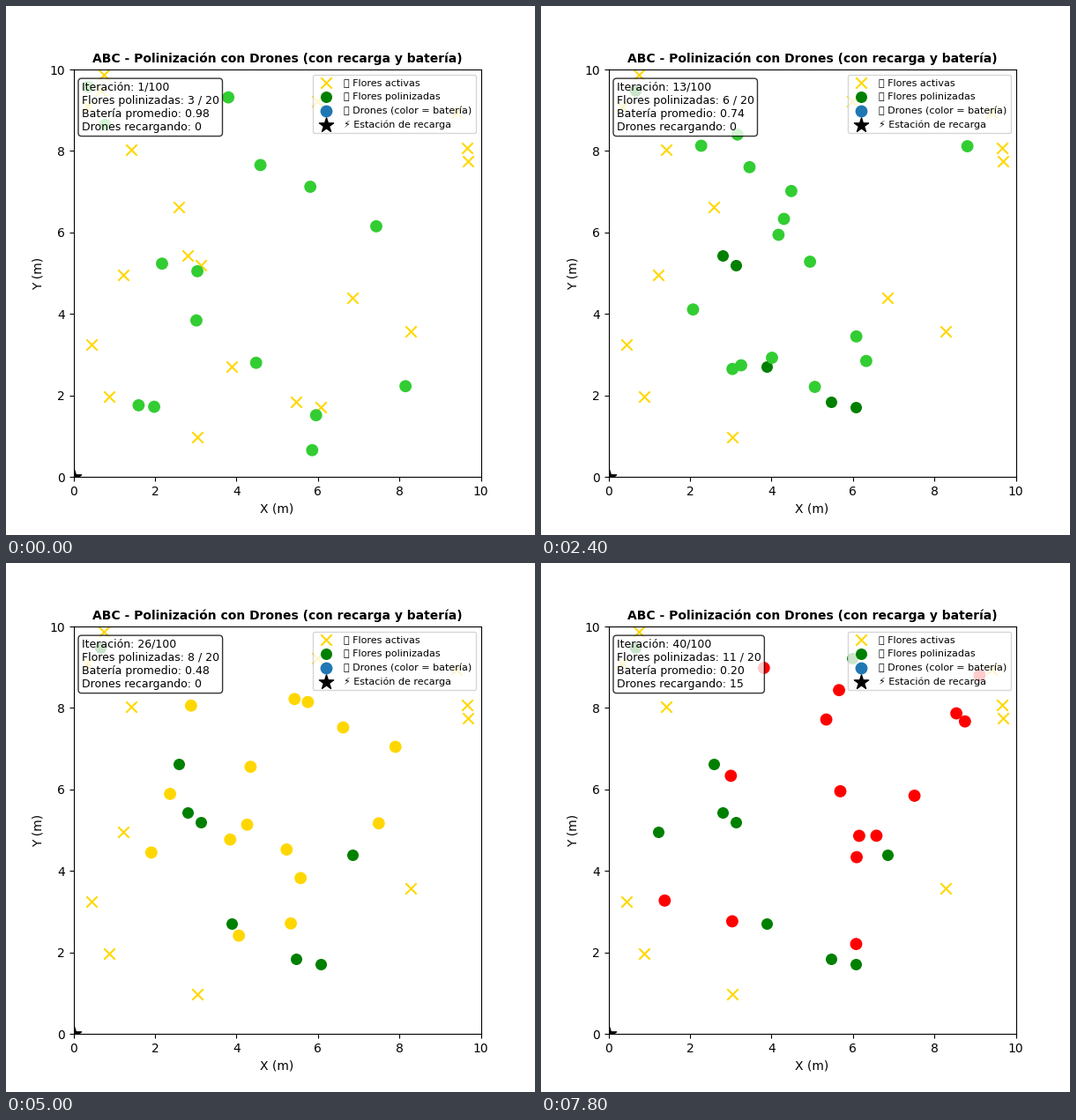
Animation of 600x600 px, one loop 8000 ms. Source, as a matplotlib script:

```python
import matplotlib.pyplot as plt
import numpy as np
from matplotlib.animation import FuncAnimation

FRAMES, STEP_MS = 40, 200
SPEED = 0.2    # metres per iteration
ARRIVE = 0.5   # close enough to head for the next flower
REACH = 0.4    # close enough to pollinate

rng = np.random.RandomState(42)
start = rng.rand(15, 2) * 10
flowers = rng.rand(20, 2) * 10

# flowers each drone heads for, in order
routes = [
    [0, 2], [11, 3], [7, 13], [10], [18, 11], [16], [8, 10], [3, 12],
    [3, 10], [0, 15, 2], [5, 5, 12], [12, 6], [9, 14], [11], [9, 11],
]


def fly(pos, route):
    """Positions of one drone, moving at constant speed from flower to flower."""
    path, leg = [], 0
    for _ in range(FRAMES):
        way = flowers[route[leg]] - pos
        pos = pos + SPEED * way / np.linalg.norm(way)
        path.append(pos)
        if np.linalg.norm(flowers[route[leg]] - pos) < ARRIVE:
            leg = min(leg + 1, len(route) - 1)
    return path


drones = np.stack([fly(p, r) for p, r in zip(start, routes)], axis=1)

# done[k] marks the flowers visited up to and including step k
gap = np.linalg.norm(drones[:, :, None] - flowers, axis=-1)
done = np.logical_or.accumulate((gap < REACH).any(axis=1), axis=0)

fig, ax = plt.subplots(figsize=(6, 6), dpi=100)
ax.set(xlim=(0, 10), ylim=(0, 10), aspect="equal", xlabel="X (m)", ylabel="Y (m)")
ax.set_title("ABC - Polinización con Drones (con recarga y batería)",
             fontsize=10, fontweight="bold")

active = ax.scatter([], [], c="gold", marker="x", s=80, label="🌼 Flores activas")
visited = ax.scatter([], [], c="green", s=70, label="🌸 Flores polinizadas")
swarm = ax.scatter([], [], s=80, label="🚁 Drones (color = batería)")
ax.scatter([0], [0], c="black", marker="*", s=150, label="⚡ Estación de recarga")
ax.legend(loc="upper right", fontsize=8)
info = ax.text(0.02, 0.97, "", transform=ax.transAxes, fontsize=9, va="top",
               bbox=dict(boxstyle="round,pad=0.3", facecolor="white", alpha=0.8))


def update(k):
    battery = 98 - 2 * k
    color = "limegreen" if battery > 50 else "gold" if battery > 30 else "red"
    charging = len(start) if battery <= 20 else 0
    # flower markers follow one step behind the counter
    shown = done[k - 1] if k else np.zeros(len(flowers), bool)
    active.set_offsets(flowers[~shown])
    visited.set_offsets(flowers[shown])
    swarm.set_offsets(drones[k])
    swarm.set_color([color] * len(start))
    info.set_text(f"Iteración: {k + 1}/100\n"
                  f"Flores polinizadas: {done[k].sum()} / {len(flowers)}\n"
                  f"Batería promedio: {battery / 100:.2f}\n"
                  f"Drones recargando: {charging}")
    return active, visited, swarm, info


anim = FuncAnimation(fig, update, frames=FRAMES, interval=STEP_MS,
                     repeat=True, repeat_delay=0)
plt.show()
```
